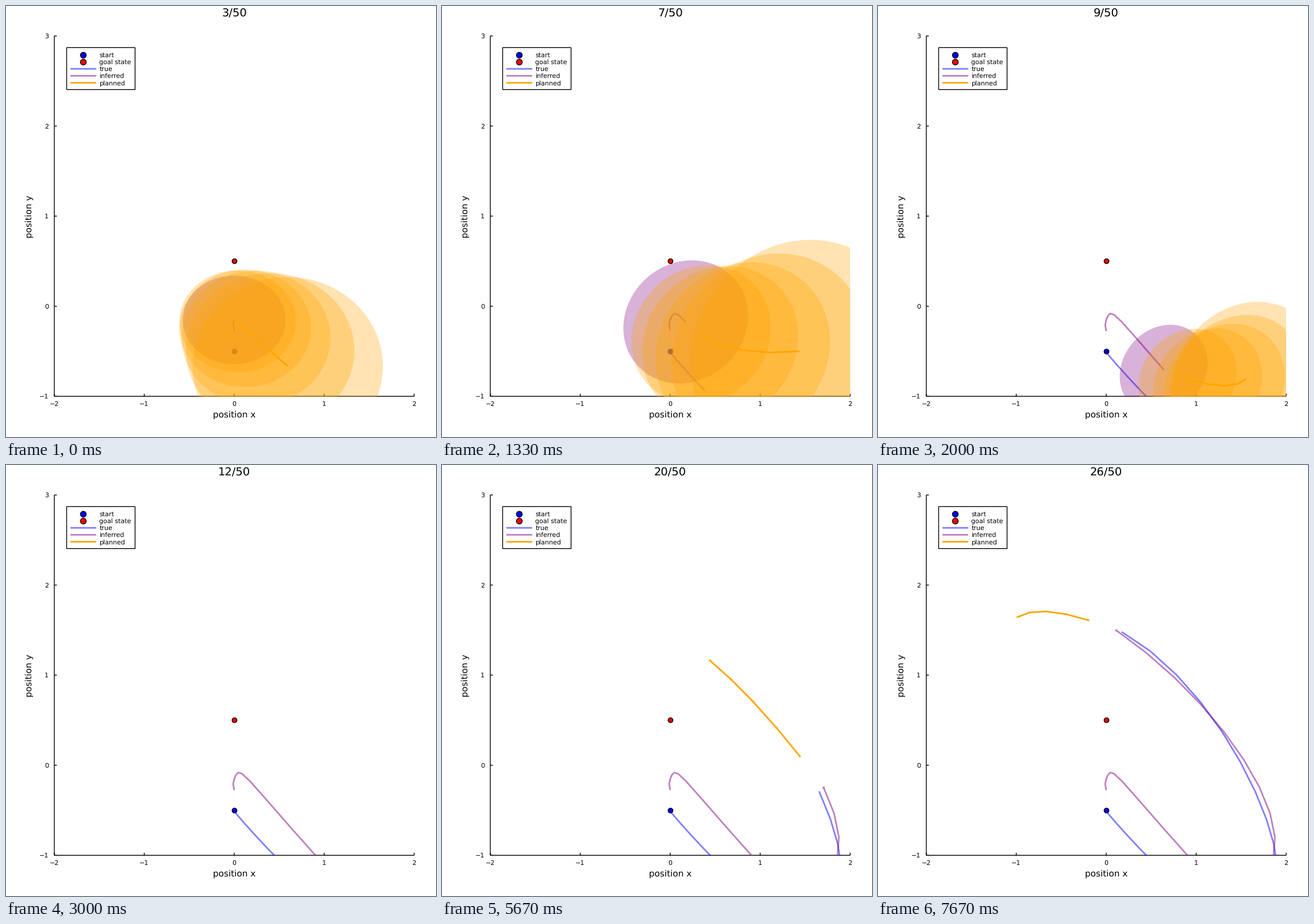
A matplotlib script for the animation above (8000 ms loop, 748 by 749 pixels).

```python
import numpy as np
import matplotlib.pyplot as plt
from matplotlib.animation import FuncAnimation
from matplotlib.patches import Polygon, Rectangle

W, H, DPI = 748, 749, 100
FIRST, STEPS = 3, 24
FRAMES, LOOP_MS = 160, 8000
LEFT, RIGHT, TOP, BOTTOM = 84, 710, 52, 678.3
STAGES = 5

plt.rcParams.update({"font.family": "DejaVu Sans", "text.hinting": "none",
                     "path.snap": False})

# Key points {step: stage position}; the body leaves the plot between the phases.
# "plan" holds the first, middle and last planned position.
EARLY = {
    "true": {2: (397, 601), 4: (403, 609), 6: (434, 644), 8: (484, 696)},
    "inferred": {1: (397, 565), 3: (397, 545.5), 5: (404, 534.5),
                 7: (424, 549), 9: (497, 632)},
    "spread": {3: (89.5, 77), 5: (101, 91), 7: (108.5, 107), 9: (76.5, 78)},
    "plan": [{3: (403, 548), 5: (421, 547), 7: (451, 571), 9: (538.5, 648)},
             {3: (435, 577), 5: (476, 590), 7: (523, 598), 9: (602, 660)},
             {3: (490, 626), 5: (555, 622), 7: (622, 600), 9: (641, 648)}],
}
LATE = {
    "true": {17: (694, 695), 20: (656, 567), 23: (561, 412), 26: (424, 290)},
    "inferred": {18: (690.5, 647), 21: (636.5, 512.5), 23: (561, 415.5), 26: (414, 287)},
    "spread": {18: (2.2, 2.2)},
    "plan": [{18: (680, 606), 22: (552, 418), 26: (367, 270)},
             {18: (645, 520), 22: (448, 331), 26: (292, 254.5)},
             {18: (590, 455), 22: (366, 269), 26: (242, 264.5)}],
}
EARLY_END, LATE_START = 10, 17


def curve(keys, steps):
    """Polynomial through the key points, evaluated at the given steps."""
    nodes = np.array(list(keys), float)
    coeffs = np.polyfit(nodes, np.array(list(keys.values()), float), len(nodes) - 1)
    return np.vander(np.atleast_1d(steps), len(nodes)) @ coeffs


def travelled(name, start, step):
    early = curve(EARLY[name], np.arange(start, min(step, EARLY_END) + 1))
    late = curve(LATE[name], np.arange(LATE_START, max(step, LATE_START) + 1))
    return np.vstack([early, [[np.nan, np.nan]], late]) if step >= LATE_START else early


def plan(phase, step):
    """Centres and half sizes of the planned ellipses."""
    knots = np.vstack([curve(keys, step) for keys in phase["plan"]])
    u = np.linspace(0, 1, STAGES)
    weights = np.column_stack([(1 - u) * (1 - 2 * u), 4 * u * (1 - u), u * (2 * u - 1)])
    growth = np.array([1.14 - 0.003 * step, 1.168 - 0.006 * step])
    sizes = curve(phase["spread"], step) * growth ** np.arange(1, STAGES + 1)[:, None]
    return weights @ knots, sizes


def ellipse(center, size, corr):
    t = np.linspace(0, 2 * np.pi, 181)
    return np.column_stack([center[0] + size[0] * np.cos(t),
                            center[1] - size[1] * np.sin(t + np.arcsin(corr))])


fig = plt.figure(figsize=(W / DPI, H / DPI), dpi=DPI, facecolor="white")
ax = fig.add_axes([0, 0, 1, 1])
ax.set_xlim(0, W)
ax.set_ylim(H, 0)
ax.axis("off")
plot_area = Rectangle((LEFT, TOP), RIGHT - LEFT, BOTTOM - TOP + 0.7,
                      transform=ax.transData)


def line(xs, ys, color="black", width=1, alpha=1, z=1):
    return ax.plot(xs, ys, color=color, lw=width, alpha=alpha, zorder=z,
                   solid_capstyle="butt", solid_joinstyle="round")[0]


def dot(x, y, color, size):
    ax.plot(x, y, "o", ms=size, mfc=color, mec="black", mew=1, zorder=2)


def label(x, y, text, size, ha="center", **kwargs):
    return ax.text(x, y, text, fontsize=size, ha=ha, va="baseline", **kwargs)


def blob(color, z):
    patch = ax.add_patch(Polygon(np.zeros((3, 2)), fc=color, ec="none",
                                 alpha=0.3, zorder=z))
    patch.set_clip_path(plot_area)
    return patch


# Axes
line([LEFT, LEFT], [TOP, BOTTOM])
line([LEFT, RIGHT], [BOTTOM, BOTTOM])
for i in range(5):
    x = LEFT + i * (RIGHT - LEFT) / 4
    y = BOTTOM - i * (BOTTOM - TOP) / 4
    line([x, x], [BOTTOM, BOTTOM - 4.5])
    line([LEFT, LEFT + 4.5], [y, y])
    label(x, 695, str(i - 2).replace("-", "\u2212"), 8)
    label(74, y + 4, str(i - 1).replace("-", "\u2212"), 8, "right")
label(397, 714.5, "position x", 11)
label(44.5, 365.5, "position y", 11, rotation=90, rotation_mode="anchor")
title = label(397, 17, "", 14)

# Legend
STYLES = [("blue", 0.5), ("purple", 0.5), ("orange", 1)]
ROW = 12.1
ax.add_patch(Rectangle((105.5, 72.3), 119, 73, fc="white", ec="black", lw=1))
for i, name in enumerate(["start", "goal state", "true", "inferred", "planned"]):
    label(162.5, 89 + ROW * i, name, 8, "left")
dot(134.3, 85, "blue", 7.2)
dot(134.3, 85 + ROW, "red", 7.2)
for i, (color, alpha) in enumerate(STYLES):
    line([112, 157], [109.2 + ROW * i] * 2, color, 2, alpha)

# Moving parts
dot(396.9, 600.2, "blue", 6)
dot(396.9, 443.4, "red", 6)
true_line, inferred_line, planned_line = (
    line([], [], color, 2, alpha, z) for (color, alpha), z in zip(STYLES, (3, 4, 7)))
for path in (true_line, inferred_line, planned_line):
    path.set_clip_path(plot_area)
inferred_blob = blob("purple", 5)
planned_blobs = [blob("orange", 6) for _ in range(STAGES)]
belief = [inferred_blob, *planned_blobs, planned_line]


def update(frame):
    step = FIRST + ((frame + 1) * STEPS - 1) // FRAMES
    title.set_text(f"{step}/50")
    true_line.set_data(*travelled("true", 2, step).T)
    inferred_line.set_data(*travelled("inferred", 1, step).T)

    on_stage = step <= EARLY_END or step > LATE_START
    for artist in belief:
        artist.set_visible(on_stage)
    if on_stage:
        phase = EARLY if step <= EARLY_END else LATE
        corr = 0.025 * (step - FIRST)
        inferred_blob.set_xy(ellipse(curve(phase["inferred"], step)[0],
                                     curve(phase["spread"], step)[0], corr))
        centers, sizes = plan(phase, step)
        planned_line.set_data(*centers.T)
        for patch, center, size in zip(planned_blobs, centers, sizes):
            patch.set_xy(ellipse(center, size, corr))
    return [title, true_line, inferred_line, *belief]


anim = FuncAnimation(fig, update, frames=FRAMES, interval=LOOP_MS // FRAMES,
                     repeat=True, repeat_delay=0, blit=False)
plt.show()
```
